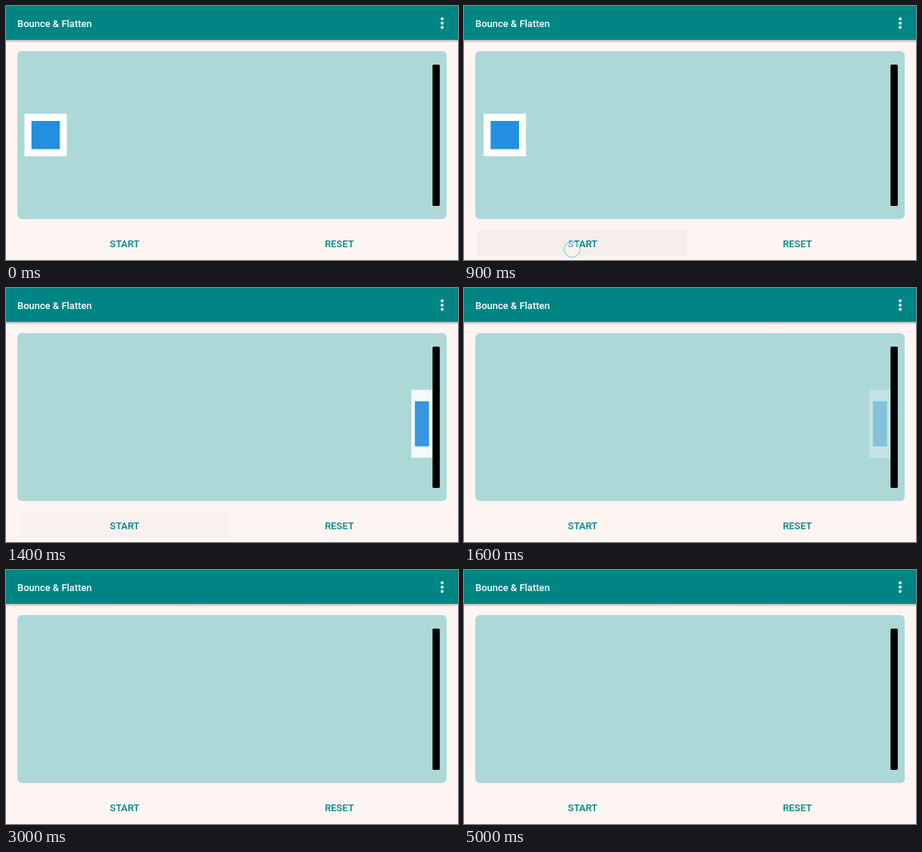
An HTML page that plays this animation: 600 by 338 pixels, repeating every 5.1 s.

```html
<!DOCTYPE html>
<html lang="en">
<head>
<meta charset="utf-8">
<title>Bounce &amp; Flatten</title>
<style>
  html, body { margin: 0; width: 100%; height: 100%; overflow: hidden; background: #fdf5f2; }
  svg { display: block; width: 600px; height: 338px; }
  text { font: 500 13px Roboto, sans-serif; fill: #008585; }
  .title { fill: #fff; }
  .label { text-anchor: middle; }
</style>
</head>
<body>
<svg viewBox="0 0 600 338">
  <defs>
    <linearGradient id="shade" x2="0" y2="1">
      <stop stop-color="#000" stop-opacity=".28"/>
      <stop offset="1" stop-color="#000" stop-opacity="0"/>
    </linearGradient>
    <clipPath id="button"><rect x="19" y="298.5" width="277" height="33.5" rx="1.5"/></clipPath>
  </defs>

  <rect width="600" height="338" fill="#fdf5f2"/>
  <rect y="45" width="600" height="4" fill="url(#shade)"/>
  <rect width="600" height="45" fill="#008585"/>
  <text class="title" x="15" y="27.5">Bounce &amp; Flatten</text>
  <g fill="#fff">
    <circle cx="579" cy="17" r="2"/>
    <circle cx="579" cy="22.8" r="2"/>
    <circle cx="579" cy="28.6" r="2"/>
  </g>

  <rect x="15" y="60" width="570" height="223.5" rx="6" fill="#add8d8"/>
  <g id="box">
    <rect x="24.5" y="143.5" width="56.2" height="56.5" fill="#fff"/>
    <rect x="33.8" y="153" width="37.7" height="37.5" fill="#228fe0"/>
  </g>
  <rect x="566.2" y="78" width="9.6" height="188" rx="1.5" fill="#000"/>

  <g clip-path="url(#button)">
    <rect id="press" x="19" y="298" width="277" height="35"/>
    <circle id="ripple" cy="318" opacity=".03"/>
  </g>
  <text class="label" x="157.5" y="320.5">START</text>
  <text class="label" x="442.5" y="320.5">RESET</text>
  <circle id="touch" cx="143.5" cy="324" r="10.3" fill="#fff" fill-opacity=".35" stroke="#9fd0da" stroke-width="1.2"/>
</svg>
<script>
const LOOP = 5100, STEP = 100;
const SLIDE = 485.5, SLIDE_START = 700, SLIDE_TIME = 687, SLIDE_POWER = 4.68;
const PIVOT = [80.7, 156.8];

// Rows of [time, value]
const tracks = {
  squash: [[1300, 0], [1400, 1]],
  fade: [[1300, 1], [1400, .87], [1700, 0]],
  press: [[800, 0], [900, .032], [1000, .055], [1200, .06], [1400, .016], [1500, 0]],
  radius: [[900, 0], [1000, 34], [1100, 68], [1300, 145]],
  ripple: [[900, 0], [1000, .03], [1100, .03], [1300, .012], [1400, 0]],
  touch: [[700, 0], [800, 1], [900, 1], [1000, 0]]
};

const $ = id => document.getElementById(id);
const box = $('box'), press = $('press'), ripple = $('ripple'), touch = $('touch');
const clamp = v => Math.min(1, Math.max(0, v));

function at(rows, t) {
  const i = rows.findIndex(row => row[0] > t);
  if (i === 0) return rows[0][1];
  if (i < 0) return rows[rows.length - 1][1];
  const [t0, a] = rows[i - 1], [t1, b] = rows[i];
  return a + (b - a) * (t - t0) / (t1 - t0);
}

function draw(t) {
  const v = name => at(tracks[name], t);
  const x = SLIDE * clamp((t - SLIDE_START) / SLIDE_TIME) ** SLIDE_POWER;
  const s = v('squash'), [px, py] = PIVOT;
  box.setAttribute('transform',
    `translate(${px + x} ${py}) scale(${1 - .5 * s} ${1 + .6 * s}) translate(${-px} ${-py})`);
  box.setAttribute('opacity', v('fade'));
  press.setAttribute('opacity', v('press'));
  ripple.setAttribute('r', v('radius'));
  ripple.setAttribute('cx', 143.5 + 14 * clamp((t - 900) / 800));
  ripple.setAttribute('opacity', v('ripple'));
  touch.setAttribute('opacity', v('touch'));
}

const start = performance.now();
function tick() {
  const t = (performance.now() - start) % LOOP;
  draw(Math.floor(t / STEP) * STEP);
  requestAnimationFrame(tick);
}
tick();
</script>
</body>
</html>
```
